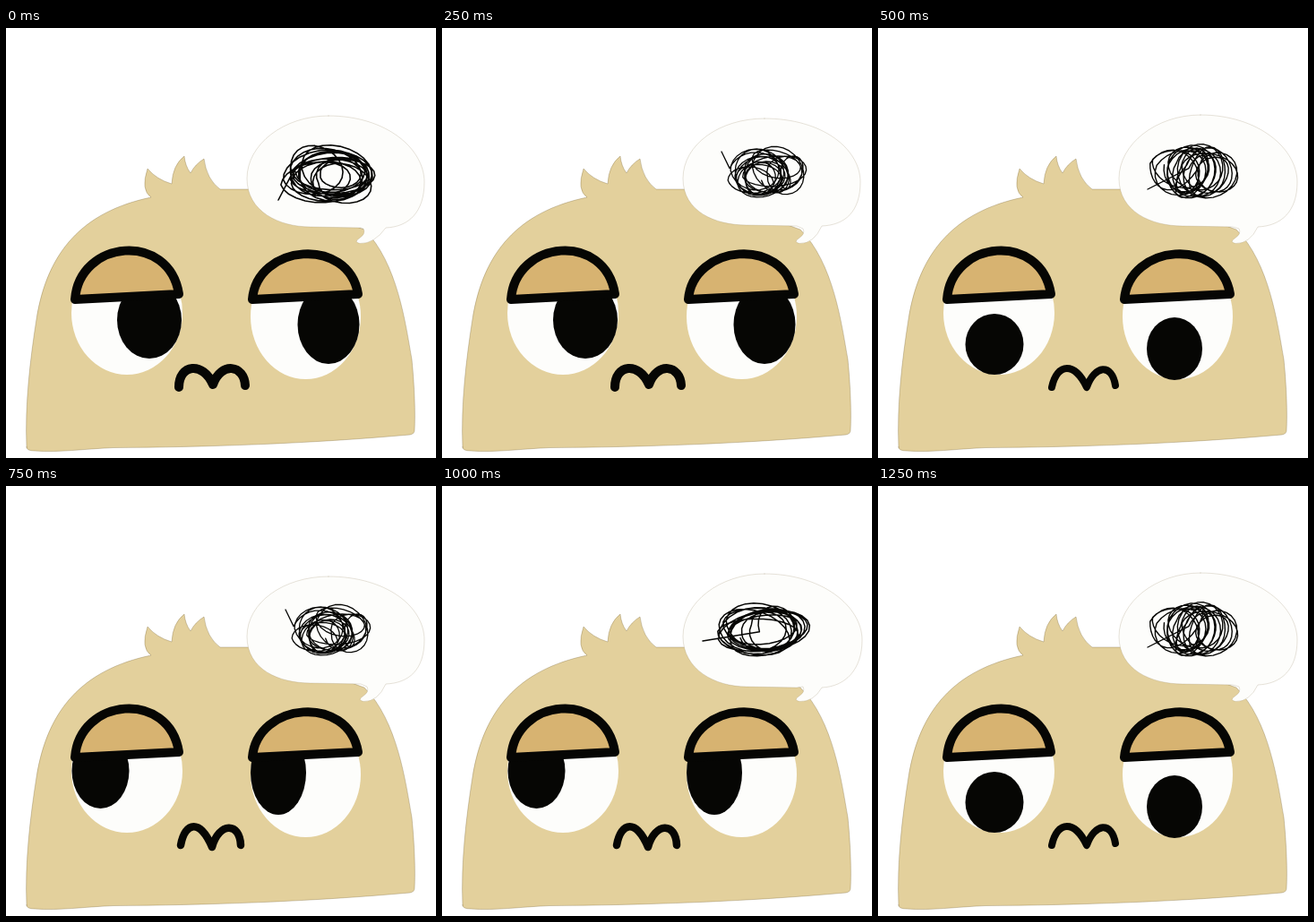
An HTML page with a canvas that plays this animation: 480x480 px, repeating every 1500 ms.

```html
<!DOCTYPE html>
<html lang="en">
<head>
<meta charset="utf-8">
<title>Grumpy thoughts</title>
<style>
html, body { margin: 0; width: 100%; height: 100%; overflow: hidden; background: #fff; }
canvas { display: block; width: 480px; height: 480px; }
</style>
</head>
<body>
<canvas id="stage" width="480" height="480"></canvas>
<script>
const ctx = document.getElementById('stage').getContext('2d');
const INK = '#060604', SKIN = '#e3d09c', LID = '#d7b371', WHITE = '#fdfdfb';
const HOLD = 250;

const body = new Path2D(`M23 468 C21 420 27 370 34 325 C46 250 85 205 162 189
  Q150 181 158 157 Q168 169 185 174 Q186 153 199 143 Q200 154 206 162
  Q211 152 221 146 Q224 169 239 180 H275 L400 225
  C437 262 446 330 453 370 C456 400 457 430 456 449 Q456 453 451 454
  C340 464 220 468 120 468.5 C85 470 60 474 32 472 Q23 472 23 468 Z`);

function oval(x, y, rx, ry) {
  const path = new Path2D();
  path.ellipse(x, y, rx, ry, 0, 0, Math.PI * 2);
  return path;
}

// Heavy eyelid: an arch of width w and rise h over a slightly tilted lash line.
const lid = (x, y, w, h) =>
  new Path2D(`M${x} ${y} c5 ${-h} ${w - 11} ${-h - 9} ${w} -6 Z`);

const eyes = [oval(135, 318, 62, 69), oval(334.5, 322, 61.5, 70)];
const lids = [lid(77, 303, 116, 67), lid(275, 303, 118, 62)];

const looks = {
  right: {
    pupils: [oval(160, 326, 36, 43), oval(360, 331, 34.5, 44)],
    mouth: new Path2D('M193 401 c0 -26 27 -29 38 -3 c9 -26 35 -22 36 1'), lip: 10
  },
  down: {
    pupils: [oval(130, 353, 32.5, 34), oval(331, 358, 31, 35)],
    mouth: new Path2D('M194 401 c6 -28 26 -28 39 0 c9 -25 28 -27 32 -2'), lip: 8
  },
  left: {
    pupils: [oval(105.5, 318, 32, 42), oval(304, 320, 31, 47)],
    mouth: new Path2D('M195 401 c5 -27 22 -29 35 2 c8 -28 31 -28 32 -2'), lip: 8.5
  }
};

// Speech bubble from its top, right and bottom edges and the tail's shift.
const bubble = (top, right, low, t) => new Path2D(`M360 ${top}
  C425 ${top} ${right} 135 ${right} 172 C${right} 205 450 ${low - 1} 424 ${low}
  Q${411 + t} 241 ${395 + t} 240.5 Q${388 + t} 239 ${394 + t} 235
  Q${402 + t} 230 ${399 + t} 224 L396 ${low} L340 ${low - 1}
  C305 ${low - 1} 269 205 269 168 C269 130 310 ${top} 360 ${top} Z`);

function random(seed) {
  return () => (seed = (seed * 16807) % 2147483647) / 2147483647;
}

// One pen line of loops that wander at random inside a box of half size w, h.
function scribble({ seed, x, y, w, h, rx, ry, tilt, turns, from }) {
  const rnd = random(seed), path = new Path2D(), steps = 24;
  const spread = () => rnd() + rnd() - 1;
  const loop = () => {
    const a = rx * (.65 + .7 * rnd()), b = ry * (.65 + .7 * rnd());
    return [
      x + spread() * Math.max(0, w - a), y + spread() * Math.max(0, h - b),
      a, b, tilt + (rnd() - .5) * .5];
  };
  path.moveTo(...from);
  let now = loop(), next = loop();
  for (let i = 0; i < turns * steps; i++) {
    const f = (i % steps) / steps, angle = Math.PI * (1 + 2 * f);
    if (i && !f) [now, next] = [next, loop()];
    const [cx, cy, a, b, lean] = now.map((v, k) => v + (next[k] - v) * f);
    const u = a * Math.cos(angle), v = b * Math.sin(angle);
    path.lineTo(cx + u * Math.cos(lean) - v * Math.sin(lean), cy + u * Math.sin(lean) + v * Math.cos(lean));
  }
  return path;
}

const thoughts = [
  {
    box: bubble(98, 467, 223, 0), pen: 1.6,
    line: scribble({ seed: 4021, x: 361, y: 162, w: 64, h: 38, rx: 34, ry: 24, tilt: 0, turns: 15, from: [304, 192] })
  },
  {
    box: bubble(101, 467, 221, 4), pen: 1.3,
    line: scribble({ seed: 9173, x: 365, y: 163, w: 60, h: 36, rx: 23, ry: 20, tilt: 0, turns: 17, from: [312, 138] })
  },
  {
    box: bubble(97, 468, 222, 4), pen: 1.4,
    line: scribble({ seed: 7309, x: 360, y: 161, w: 62, h: 33, rx: 22, ry: 24, tilt: .4, turns: 16, from: [301, 180] })
  },
  {
    box: bubble(98, 469, 225, 4), pen: 1.5,
    line: scribble({ seed: 5557, x: 361, y: 160, w: 57, h: 33, rx: 38, ry: 21, tilt: 0, turns: 13, from: [291, 173] })
  }
];

const poses = [['right', 0], ['right', 1], ['down', 2], ['left', 1], ['left', 3], ['down', 2]];

function fill(path, color) {
  ctx.fillStyle = color;
  ctx.fill(path);
}

function stroke(path, width, color = INK) {
  ctx.lineWidth = width;
  ctx.strokeStyle = color;
  ctx.stroke(path);
}

function draw([look, idea]) {
  const { pupils, mouth, lip } = looks[look];
  const { box, line, pen } = thoughts[idea];
  ctx.clearRect(0, 0, 480, 480);
  ctx.lineCap = ctx.lineJoin = 'round';
  fill(body, SKIN);
  stroke(body, .6, 'rgba(110, 90, 45, .5)');

  ctx.save();
  ctx.beginPath();
  ctx.rect(0, 298, 480, 182);
  ctx.clip();
  eyes.forEach(e => fill(e, WHITE));
  pupils.forEach(p => fill(p, INK));
  ctx.restore();
  lids.forEach(l => { fill(l, LID); stroke(l, 10); });
  stroke(mouth, lip);

  fill(box, WHITE);
  stroke(box, .5, 'rgba(110, 90, 45, .35)');
  stroke(line, pen);
}

const began = performance.now();
function tick() {
  const step = Math.floor((performance.now() - began) / HOLD) % poses.length;
  draw(poses[step]);
  requestAnimationFrame(tick);
}
tick();
</script>
</body>
</html>
```
